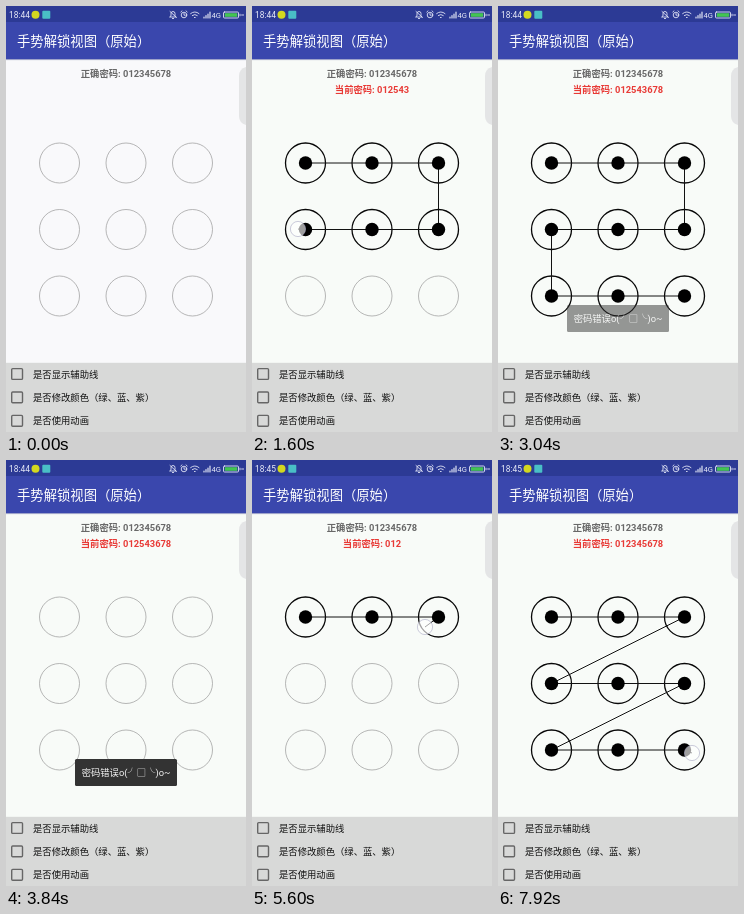
These frames come from a looping animation (240 px wide and 426 px high, 8 s). An HTML page:

```html
<!DOCTYPE html>
<html lang="zh">
<head>
<meta charset="utf-8">
<title>手势解锁视图</title>
<style>
html, body { margin: 0; width: 100%; height: 100%; overflow: hidden; background: #f8fbf8; }
svg { display: block; width: 100vw; height: 100vh; }
text { font: 9.33px Roboto, "Noto Sans CJK SC", "Noto Sans CJK", sans-serif; }
.bold { font-weight: 700; text-anchor: middle; }
.option { font-weight: 500; fill: #111; }
.thin { fill: none; stroke: #dfe3f4; stroke-width: .9; stroke-linecap: round; }
</style>
</head>
<body>
<svg id="stage" viewBox="0 0 240 426">
  <rect id="page" width="240" height="426"/>
  <rect y="53" width="240" height="1.2" fill="#c9cbd6"/>
  <rect width="240" height="53.3" fill="#3a47ad"/>
  <rect width="240" height="16" fill="#2c3a95"/>

  <text id="clock" x="3" y="12" fill="#e8ebf8" style="font-size:8.4px"></text>
  <circle cx="29.5" cy="8.7" r="4" fill="#d3d81f"/>
  <rect x="36.3" y="4.7" width="8" height="8" rx="1" fill="#49bfc6"/>
  <g class="thin">
    <path d="M164 11h6l-1-1.5v-2a2 2 0 0 0-4 0v2zM166.4 12.5h1.2M164 5.5l6.5 6"/>
    <circle cx="178" cy="9" r="2.8"/>
    <path d="M178 7.5V9.2h1.3M174.8 6l1.2-1.1M181.2 6L180 4.9"/>
    <path d="M184.6 7.6q4.2-3.4 8.4 0M186.3 9.5q2.5-2 5 0M188.4 11.5h.8"/>
    <path d="M198 12v-1M200 12v-2.4M202 12V8M204 12V6" stroke-width="1.2"/>
    <rect x="217.5" y="6" width="15" height="6" rx="1"/>
    <path d="M234 8.2v1.6M235.6 9h2" />
  </g>
  <rect x="218.8" y="7.2" width="12.4" height="3.6" fill="#43c552"/>
  <text x="205.5" y="12" fill="#e8ebf8" style="font-size:7.6px">4G</text>
  <text x="11" y="39.5" fill="#fff" style="font-size:13.33px">手势解锁视图（原始）</text>

  <path d="M240 61q-7 2-7 9v40q0 7 7 9z" fill="#e4e5e6"/>
  <text class="bold" x="120" y="71.3" fill="#686868">正确密码: 012345678</text>
  <text class="bold" id="current" x="120" y="87.3" fill="#e83a36"></text>

  <g id="rings" fill="none"></g>
  <polyline id="trail" fill="none" stroke="#111" stroke-width="1"/>
  <g id="dots"></g>

  <rect y="356.8" width="240" height="70" fill="#d8d9d8"/>
  <g id="options"></g>

  <circle id="finger" r="7.6" fill="#fff" fill-opacity=".62" stroke="#a9a9c4" stroke-opacity=".75" stroke-width=".8"/>
  <g id="toast">
    <rect x="69" y="299" width="102" height="27" rx="1.5" fill="#333"/>
    <text x="120" y="316" fill="#f4f4f4" text-anchor="middle">密码错误o(╯□╰)o~</text>
  </g>
</svg>
<script>
const $ = id => document.getElementById(id);
const LOOP = 8000, STEP = 80, HIT = 20;
const nodes = Array.from({length: 9}, (_, i) => ({
  x: 53.5 + i % 3 * 66.5,
  y: 157 + Math.floor(i / 3) * 66.5
}));

// Each finger stroke: [ms, x, y] waypoints, and when the pattern clears.
const strokes = [
  { clear: 3760, path: [[400, 50, 158], [880, 186, 156], [1120, 187, 223], [1600, 46, 223],
                        [1840, 50, 288], [2480, 184, 283], [2720, 186, 285]] },
  { clear: LOOP, path: [[5040, 50, 158], [5500, 186, 157], [5600, 173, 167], [6080, 50, 224],
                        [6560, 185, 226], [6640, 189, 229], [7160, 51, 291],
                        [7720, 186, 291], [7920, 194, 293], [LOOP, 194, 293]] }
];

function add(parent, name, attrs, text = '') {
  const el = document.createElementNS('http://www.w3.org/2000/svg', name);
  for (const key in attrs) el.setAttribute(key, attrs[key]);
  el.textContent = text;
  return parent.appendChild(el);
}

const rings = nodes.map(n => add($('rings'), 'circle', {cx: n.x, cy: n.y, r: 20}));
const dots = nodes.map(n => add($('dots'), 'circle', {cx: n.x, cy: n.y, r: 6.7}));
['是否显示辅助线', '是否修改颜色（绿、蓝、紫）', '是否使用动画'].forEach((label, i) => {
  const y = 368 + i * 23.4;
  add($('options'), 'rect', {x: 5.7, y: y - 5.4, width: 10.8, height: 10.8, rx: 1,
    fill: 'none', stroke: '#666', 'stroke-width': 1.4});
  add($('options'), 'text', {x: 27, y: y + 3.6, class: 'option'}, label);
});

const clamp = v => Math.max(0, Math.min(1, v));

function fingerAt(path, t) {
  const i = Math.max(1, path.findIndex(p => p[0] >= t));
  const [t0, x0, y0] = path[i - 1], [t1, x1, y1] = path[i];
  const k = clamp((t - t0) / (t1 - t0));
  return {x: x0 + (x1 - x0) * k, y: y0 + (y1 - y0) * k};
}

function nodesHit(path, t) {
  const hit = [], end = Math.min(t, path[path.length - 1][0]);
  for (let s = path[0][0]; s <= end; s += 20) {
    const p = fingerAt(path, s);
    const i = nodes.findIndex(n => Math.hypot(n.x - p.x, n.y - p.y) < HIT);
    if (i >= 0 && !hit.includes(i)) hit.push(i);
  }
  return hit;
}

function draw(t) {
  const stroke = strokes.filter(s => t >= s.path[0][0]).pop();
  const hit = stroke ? nodesHit(stroke.path, t) : [];
  const shown = stroke && t < stroke.clear ? hit : [];
  const touching = stroke && t < stroke.path[stroke.path.length - 1][0];
  const points = shown.map(i => nodes[i]);

  $('finger').style.display = touching ? '' : 'none';
  if (touching) {
    const p = fingerAt(stroke.path, t);
    $('finger').setAttribute('cx', p.x);
    $('finger').setAttribute('cy', p.y);
    points.push(p);
  }
  $('trail').setAttribute('points', points.map(p => p.x + ',' + p.y).join(' '));
  nodes.forEach((_, i) => {
    const on = shown.includes(i);
    rings[i].setAttribute('stroke', on ? '#080808' : '#999');
    rings[i].setAttribute('stroke-width', on ? 1.3 : .7);
    dots[i].style.display = on ? '' : 'none';
  });

  $('page').setAttribute('fill', t < 400 ? '#f9f9fb' : '#f8fbf8');
  $('clock').textContent = t < 4720 ? '18:44' : '18:45';
  $('current').textContent = stroke ? '当前密码: ' + hit.join('') : '';
  $('toast').style.opacity = Math.min(clamp((t - 2800) / 480), clamp((5040 - t) / 400));
}

const start = performance.now();
function tick() {
  const t = (performance.now() - start) % LOOP;
  draw(Math.floor(t / STEP) * STEP);
  requestAnimationFrame(tick);
}
tick();
</script>
</body>
</html>
```
